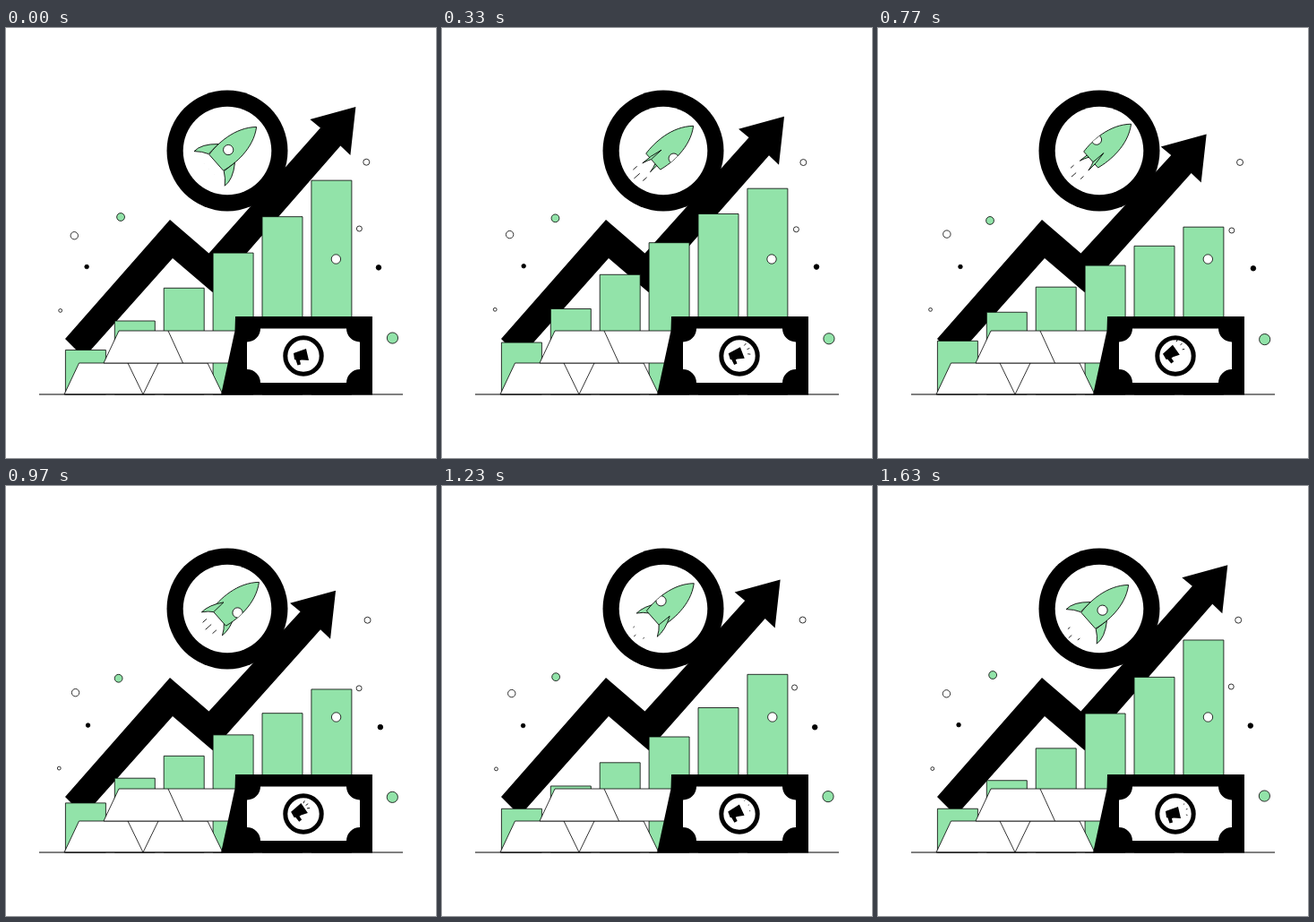
These frames come from a looping animation (480 by 480 pixels, 1.67 s). An HTML page:

```html
<!DOCTYPE html>
<html lang="en">
<head>
<meta charset="utf-8">
<title>Growth chart</title>
<style>
  html, body { margin: 0; width: 100%; height: 100%; overflow: hidden; background: #fff; }
  svg { display: block; width: 100%; height: 100%; }
  .line { stroke: #000; stroke-width: .8; stroke-linejoin: round; }
  .green { fill: #92e3a9; }
  .white { fill: #fff; }
  .none { fill: none; }
</style>
</head>
<body>
<svg viewBox="0 0 480 480">
  <defs>
    <clipPath id="hull"><path d="M-19.5-12C-5-15 22-16 40.5 0C22 16-5 15-19.5 12Z"/></clipPath>
  </defs>

  <path id="arrow"/>
  <circle cx="247" cy="137" r="67.5"/>
  <circle class="white" cx="247" cy="137" r="49.3"/>

  <g id="rocket" class="line green">
    <path id="backFin"/>
    <path d="M-19.5-12C-5-15 22-16 40.5 0C22 16-5 15-19.5 12Z"/>
    <g clip-path="url(#hull)"><circle id="porthole" class="white" r="5.6"/></g>
    <path id="frontFin"/>
    <path id="smoke" class="none"/>
  </g>

  <g id="bars" class="line green"></g>

  <g class="line white">
    <path d="M65 409L81.500 374H225L242 409Z"/>
    <path d="M109 374L126 338H262V374Z"/>
    <path class="none" d="M136 374L153 409L170 374M181 338L197.500 374"/>
  </g>
  <path d="M37 409H443" stroke="#000"/>

  <path d="M256 322H409V409.500H240L255.500 338Z"/>
  <path class="white" d="M284 335.500H380A15 15 0 0 0 395 350.500V381A15 15 0 0 0 380 396H284A15 15 0 0 0 269 381V350.500A15 15 0 0 0 284 335.500Z"/>
  <circle cx="332" cy="366" r="20.200" fill="#fff" stroke="#000" stroke-width="5"/>
  <g id="horn">
    <path d="M-8-3L6-8L9 5L1 4.500L-1 5L0 9.500L-3.500 10.500L-5.500 4.500L-7 4Z"/>
    <path id="sound" class="line none"/>
  </g>

  <g id="dots" class="line"></g>
</svg>
<script>
  const LOOP = 1670;
  const TAU = Math.PI * 2;
  const el = id => document.getElementById(id);
  const set = (node, attrs) => {
    for (const key in attrs) node.setAttribute(key, attrs[key]);
    return node;
  };
  const add = (parent, tag, attrs) =>
    set(parent.appendChild(document.createElementNS('http://www.w3.org/2000/svg', tag)), attrs);
  // Cosine over one loop, highest at `peak` ms
  const wave = (t, peak) => Math.cos(TAU * (t - peak) / LOOP);

  // Mean top edge and swing, left to right
  const bars = [[355, 7.2], [323.5, 12.3], [291.8, 17], [260.5, 21], [229.3, 25], [197.8, 29.5]]
    .map(([top, swing], i) => ({
      top, swing, peak: 595 - 100 * i,
      node: add(el('bars'), 'rect', { x: 66.4 + 54.9 * i, width: 45 })
    }));

  // x, y, radius, fill, then swing and peak time for x and for y
  const dots = [
    [126.6, 213, 4.4, '#92e3a9', 1.6, -110, 2, 835],
    [76.7, 231, 4.2, '#fff', 1.1, 1150, 1, 1480],
    [91, 266.6, 2.3, '#000', 1, 700, .9, 1230],
    [59.7, 315, 1.9, '#fff', 1.3, 1480, 1, 1370],
    [403.1, 149.8, 3.5, '#fff', 1, 680, .3, 500],
    [394.5, 225, 3, '#fff', 1, 450, 1, 800],
    [417.3, 268, 2.8, '#000', 1.8, 640, 1.4, 1130],
    [431.5, 346.8, 6.1, '#92e3a9', .5, 450, .8, 750],
    [368.4, 258, 5.2, '#fff', .4, 1250, 0, 0]
  ].map(([x, y, r, fill, ax, px, ay, py]) => ({
    x, y, ax, px, ay, py, node: add(el('dots'), 'circle', { r, fill })
  }));

  function drawArrow(t) {
    const c = wave(t, -5);
    const x = 378.4 + 12 * c, y = 103.5 - 15.5 * c;
    const head = [[-39.5, 23.5], [-51, 14], [0, 0], [-6, 54], [-17, 43.5]]
      .map(([dx, dy]) => `${x + dx} ${y + dy}`).join('L');
    set(el('arrow'), { d: `M66 347L183 214L226.5 251.5L${head}L230.5 295L186 257L87 368Z` });
  }

  // `k` runs from 1 (seen flat) through 0 (edge on) to -1
  const fin = k =>
    `M-4 ${14 * k}Q-18 ${27 * k} -29.600 ${26 * k}Q-23 ${20 * k} -19.500 ${13 * k}Z`;

  // Dash that grows away from the start, then is eaten up from behind
  const dash = (p, length) => [length * p ** 3, length * Math.sin(p * Math.PI / 2)];

  function drawRocket(t, puff) {
    const lift = 1.5 - 1.5 * wave(t, 0);
    set(el('rocket'), { transform: `translate(${249.3 + lift} ${137.3 - 1.1 * lift}) rotate(-41.5)` });

    const phase = t * 3 / LOOP % 1;
    const half = (phase + .02 + .036 * Math.cos(TAU * phase - 1)) % 1;
    const k = Math.cos(Math.PI * half);
    const side = Math.sin(Math.PI * half) * (half < .5 ? -1 : 1);
    set(el('porthole'), { cy: 13 * side });
    set(el('frontFin'), { d: fin(k) });
    set(el('backFin'), { d: fin(-k) });

    set(el('smoke'), {
      d: [[-8, 13], [0, 19], [8.5, 13]].map(([y, length]) => {
        const [a, b] = dash(puff, length);
        return `M${-30 - a} ${y}H${-30 - b}`;
      }).join('')
    });
  }

  function drawHorn(t, puff) {
    const tilt = (1 - wave(t, -10)) / 2;
    set(el('horn'), { transform: `translate(${329 - 2.5 * tilt} ${366 - 2.5 * tilt}) rotate(${-23 * tilt})` });
    const [a, b] = dash(puff, 7);
    set(el('sound'), {
      d: [-.75, -.25, .25].map(angle => {
        const c = Math.cos(angle), s = Math.sin(angle);
        const at = r => `${3 + (7 + r) * c} ${-2 + (7 + r) * s}`;
        return `M${at(a)}L${at(b)}`;
      }).join('')
    });
  }

  function draw(t) {
    const puff = t * 4 / LOOP % 1;
    for (const { node, top, swing, peak } of bars) {
      const y = top - swing * wave(t, peak);
      set(node, { y, height: 409 - y });
    }
    for (const { node, x, y, ax, px, ay, py } of dots) {
      set(node, { cx: x + ax * wave(t, px), cy: y + ay * wave(t, py) });
    }
    drawArrow(t);
    drawRocket(t, puff);
    drawHorn(t, puff);
  }

  const start = performance.now();
  function tick() {
    draw((performance.now() - start) % LOOP);
    requestAnimationFrame(tick);
  }
  tick();
</script>
</body>
</html>
```
